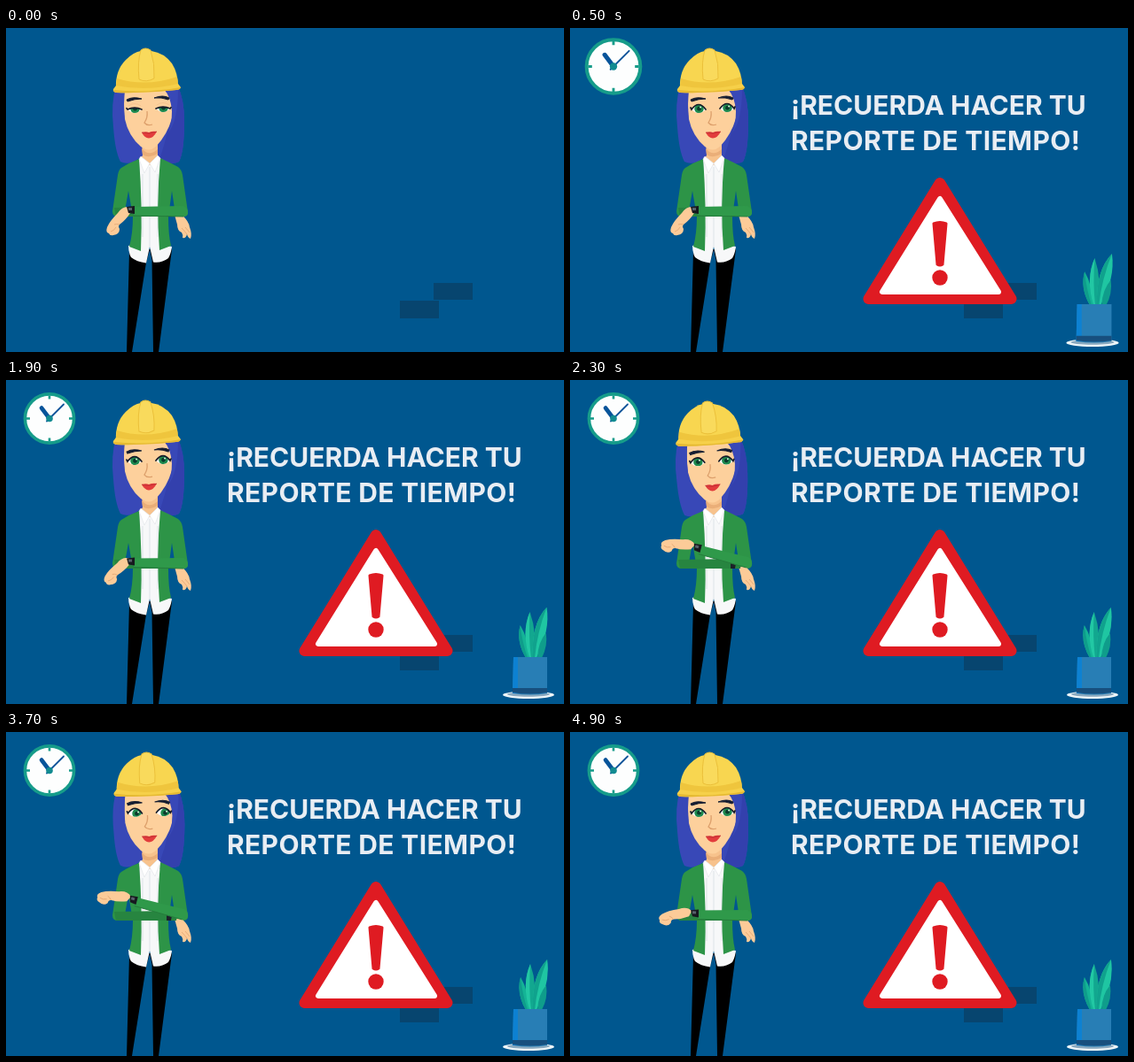
Recreate the animation shown at these times as an HTML page. Size 629 by 366 pixels, loop 5000 ms.

```html
<!DOCTYPE html>
<html lang="es">
<head>
<meta charset="utf-8">
<title>Recordatorio</title>
<style>
  html, body { margin: 0; width: 100%; height: 100%; overflow: hidden; background: #00578f; }
  svg { display: block; width: 100vw; height: 100vh; }
  text { font: 700 30px Inter, "Open Sans", sans-serif; fill: #e8edf3; }
</style>
</head>
<body>
<svg viewBox="0 0 629 366">
  <defs>
    <clipPath id="eyeClip"><path class="almond"/></clipPath>
    <g id="eye">
      <path class="almond" fill="#fff"/>
      <g clip-path="url(#eyeClip)">
        <g class="iris">
          <circle r="5.2" fill="#1f8a4e"/>
          <circle r="2.4" fill="#0b3a2c"/>
          <circle cx="1.6" cy="-1.7" r="1" fill="#d9f2e0"/>
        </g>
      </g>
    </g>
  </defs>
  <rect width="629" height="366" fill="#00578f"/>
  <path d="M482 288h44v19h-44zM444 308h44v20h-44z" fill="#07456f"/>

  <g id="clock">
    <circle r="27.6" fill="#fdfefe" stroke="#169c8a" stroke-width="3.6"/>
    <path d="M0 -26v4M0 26v-4M-26 0h4M26 0h-4" stroke="#169c8a" stroke-width="2.6"/>
    <path d="M0 0L-9 -12" stroke="#07549a" stroke-width="4.6" stroke-linecap="round"/>
    <path d="M-3 3L16 -16" stroke="#07549a" stroke-width="1.8" stroke-linecap="round"/>
    <circle r="3.8" fill="#128b91"/>
  </g>

  <g id="title">
    <text x="249" y="97.5">¡RECUERDA HACER TU</text>
    <text x="249" y="137.5" letter-spacing=".35">REPORTE DE TIEMPO!</text>
  </g>

  <g id="sign" stroke-linejoin="round">
    <path d="M417 175L336.5 306H497.5Z" fill="#df1b22" stroke="#df1b22" stroke-width="12"/>
    <path d="M417 193L352 298H483Z" fill="#fff" stroke="#fff" stroke-width="6"/>
    <path d="M410 221Q417 218 424 221L420 267Q417 269 414 267Z" fill="#df1b22" stroke="#df1b22" stroke-width="3"/>
    <circle cx="417" cy="282" r="8.7" fill="#df1b22"/>
  </g>

  <g id="plant">
    <ellipse cx="589" cy="355.7" rx="29" ry="4.3" fill="#eef5f8"/>
    <ellipse cx="589" cy="355" rx="24" ry="2.8" fill="#8aa9bf"/>
    <g id="leaves">
      <path d="M586 314Q575 295 580 277Q589 292 590 314Z" fill="#14b496"/>
      <path d="M586 314Q575 295 580 277Q582 296 588 314Z" fill="#0f9d8b"/>
      <path d="M590 314Q581 285 591 262Q600 288 594 314Z" fill="#12a78f"/>
      <path d="M590 314Q581 285 591 262Q589 290 592 314Z" fill="#22c8a4"/>
      <path d="M594 314Q592 276 610 257Q614 283 598 314Z" fill="#1fc6a2"/>
      <path d="M594 314Q592 276 610 257Q599 285 596 314Z" fill="#10a28d"/>
      <path d="M599 314Q600 296 609 286Q611 301 604 314Z" fill="#0f9d8b"/>
    </g>
    <path d="M572 313H610V354Q591 357 571 354Z" fill="#287eb5"/>
    <path d="M572 313H577V354H571Z" fill="#0d81d2"/>
    <path d="M571 348H610V353Q591 356 571 353Z" fill="#174f7e"/>
  </g>

  <g id="woman">
    <g class="head">
      <path d="M124 66Q118 85 121 112Q123 140 129 151Q139 156 150 147H174Q186 156 195 151Q201 140 201 105Q201 82 194 66Z" fill="#3848b7"/>
      <path d="M186 70Q187 110 173 148Q186 156 195 151Q201 140 201 105Q201 82 194 66Z" fill="#3340ad"/>
    </g>
    <path d="M153 128H171V145L174 149L162 157L150 149L154 144Z" fill="#f7c28c"/>
    <path d="M153 136Q161 146 171 137V142Q161 148 154 143Z" fill="#eaae78"/>

    <path d="M139 252L162 250L158 265L142 366H136ZM162 250L187 250L172 366H166L164.5 262Z" fill="#000"/>
    <path d="M150 149L162 155L174 147L174 244L187 247Q186 255 183 260Q175 266 166 264.5L162 247L158 265.5Q147 264 141 259Q138 254 138 246L152 242Z" fill="#f7f8f9"/>
    <path d="M162 157V247M154 165V236M171 165V236" stroke="#dde3e7" stroke-width="1" fill="none"/>

    <path d="M150 148Q139 152 130 158Q127 160 126 166L120 207Q120 213 126 213L133 212L138 184L143 213Q143 232 139 247L152 252Q154 200 150 148Z" fill="#2d9447"/>
    <path d="M174 147Q185 152 194 157Q198 160 199 166L205 208Q205 213 199 213L191 211L187 184L183 213Q183 234 186 246L173 251Q169 200 174 147Z" fill="#2d9447"/>
    <path d="M150 148L152 145L162 153L156 164ZM174 147L171 144L162 153L168 163Z" fill="#fff" stroke="#e2e6ea" stroke-width=".7"/>

    <path d="M190 211L198 211Q206 218 207 225Q210 233 208 238Q205 237 204 233Q203 238 199 237Q200 234 198 231Q193 229 193 222Z" fill="#fccb98"/>
    <path d="M198 226Q201 229 204 233M202 225L207 231" stroke="#e2a672" stroke-width=".8" fill="none"/>
    <path d="M122 203L182 202L193 207L192 213L124 213Z" fill="#278540"/>
    <path d="M181 206L187 207L186 213L181 213Z" fill="#1c2128"/>

    <g id="arm">
      <g id="hand">
        <path d="M139 202Q131 201 126 209Q117 218 114 225Q112 231 116 232Q117 235 121 234Q128 233 128 227Q126 224 128 222Q135 217 140 209Z" fill="#fccb98"/>
        <path d="M118 230Q122 229 124 225M128 222Q124 221 122 222" stroke="#e2a672" stroke-width=".8" fill="none"/>
      </g>
      <path d="M144 202L200 201Q206 204 205 210Q204 213 200 213L144 212Z" fill="#2f994a"/>
      <path d="M144 212L200 213" stroke="#257d3c" stroke-width="1"/>
      <path d="M136 202L145 201L145 210L138 209Z" fill="#17191f"/>
      <path d="M138 203h4v3h-4z" fill="#58616b"/>
    </g>

    <g class="head">
      <path d="M134 66Q132 85 134 103Q138 122 152 134Q161 141 169 134Q182 120 187 102Q189 82 186 66Z" fill="#fdd09c"/>
      <path d="M134 68Q132 88 134 108Q125 90 126 68ZM178 69Q186 78 187 94Q187 108 183 118Q194 105 194 68Z" fill="#3848b7"/>
      <path d="M136 81Q143 77 153 80Q145 80 137 83ZM184 79Q177 75 167 79Q175 78 183 81Z" fill="#151d31" stroke="#151d31" stroke-width="1"/>
      <use href="#eye" x="145" y="91"/>
      <use href="#eye" x="177" y="90"/>
      <path class="lash" transform="translate(145 91)" fill="none" stroke="#141a28" stroke-width="1.7" stroke-linecap="round"/>
      <path class="lash" transform="translate(177 90) scale(-1 1)" fill="none" stroke="#141a28" stroke-width="1.7" stroke-linecap="round"/>
      <path id="crease" d="M138 88Q145 83 152 88M170 87Q177 82 184 87" fill="none" stroke="#d89c69" stroke-width="1"/>
      <path d="M159 94Q160 101 156 107Q159 111 165 109" fill="none" stroke="#dda06c" stroke-width="1.3"/>
      <path d="M153 118Q158 116.5 161 118Q165 116 170 117Q166 124.5 161 124.5Q156 124 153 118Z" fill="#e23c3c"/>
      <path d="M153 118Q161 120.5 170 117" fill="none" stroke="#b52b33" stroke-width=".7"/>
      <path d="M124 68Q123 48 135 36Q144 27 152 26H164Q178 28 187 40Q194 51 194 66Q159 75 124 68Z" fill="#f8d650"/>
      <path d="M125 57Q158 67 193 55L194 66Q159 75 124 68Z" fill="#efc53d"/>
      <path d="M150 58Q148 38 152 25Q157 21 163 25Q168 40 167 57Q158 62 150 58Z" fill="#f9da5c" stroke="#ebc03a" stroke-width="1"/>
      <path d="M124 65Q158 72 194 63L197 67Q196 70 192 70Q158 74 124 73Q120 72 121 69Z" fill="#f6d049"/>
      <path d="M121 70Q158 74 197 67Q196 70 192 70Q158 74 124 73Q121 72 121 70Z" fill="#e5b932"/>
    </g>
  </g>
</svg>
<script>
  const LOOP = 5000, STEP = 100;
  const BLINKS = [-65, 1520, 3095, 4650];
  const $ = id => document.getElementById(id);
  const all = cls => document.querySelectorAll("." + cls);
  const set = (el, name, value) => el.setAttribute(name, value);
  const setAll = (els, name, value) => els.forEach(el => set(el, name, value));
  const clamp = x => Math.min(1, Math.max(0, x));
  const ramp = (t, a, b) => { const x = clamp((t - a) / (b - a)); return x * x * (3 - 2 * x); };
  const easeOut = (t, a, b) => 1 - (1 - clamp((t - a) / (b - a))) ** 3;

  const parts = {
    clock: $("clock"), title: $("title"), sign: $("sign"), plant: $("plant"),
    leaves: $("leaves"), arm: $("arm"), hand: $("hand"), crease: $("crease"),
    heads: all("head"), almonds: all("almond"), lashes: all("lash"), irises: all("iris")
  };

  // Grow past full size, then settle.
  const pop = (t, over) => easeOut(t, 0, 400) * (1 + over) - over * ramp(t, 400, 680);
  const scaleAt = (x, y, s) => `translate(${x} ${y}) scale(${s}) translate(${-x} ${-y})`;

  function drawEyes(t, down) {
    const gap = Math.min(...BLINKS.map(b => Math.abs(t - b)));
    const open = ramp(gap, 0, 110);
    const top = 10 - 20 * open;
    setAll(parts.almonds, "d", `M-8 1Q0 ${top} 8 1Q0 9 -8 1Z`);
    setAll(parts.lashes, "d", `M-9 ${1 - 2 * open}L-8 1Q0 ${top} 8 1`);
    setAll(parts.irises, "transform", `translate(${.5 + 1.5 * down} ${.2 + down})`);
    set(parts.crease, "opacity", .7 * (1 - open));
  }

  function draw(t) {
    set(parts.clock, "transform", `translate(49 43.5) scale(${pop(t, .14)})`);
    set(parts.plant, "transform", scaleAt(589, 356, pop(t, .03)));
    set(parts.sign, "transform", scaleAt(417, 245, easeOut(t, 0, 420)));
    set(parts.title, "transform", `translate(0 ${30 * (1 - easeOut(t, 0, 680))})`);
    set(parts.title, "opacity", ramp(t, 0, 380));
    set(parts.leaves, "transform", `rotate(${.5 * Math.sin(t / LOOP * 4 * Math.PI)} 592 314)`);

    const lift = ramp(t, 1850, 2300) - ramp(t, 4300, 4980);
    const bend = ramp(t, 1800, 2200);
    set(parts.arm, "transform", `rotate(${15 * lift} 203 208)`);
    set(parts.hand, "transform", `translate(${-4 * bend} 0) rotate(${36 * bend} 139 206)`);

    const tilt = ramp(t, 1850, 2250) - ramp(t, 3150, 3600);
    const down = ramp(t, 3200, 3500) - ramp(t, 4000, 4400);
    setAll(parts.heads, "transform", `translate(0 ${tilt}) rotate(${.5 * down - 1.2 * tilt} 161 146)`);
    drawEyes(t, down);
  }

  const start = performance.now();
  function tick() {
    const t = (performance.now() - start) % LOOP;
    draw(Math.floor(t / STEP) * STEP);
    requestAnimationFrame(tick);
  }
  tick();
</script>
</body>
</html>
```
